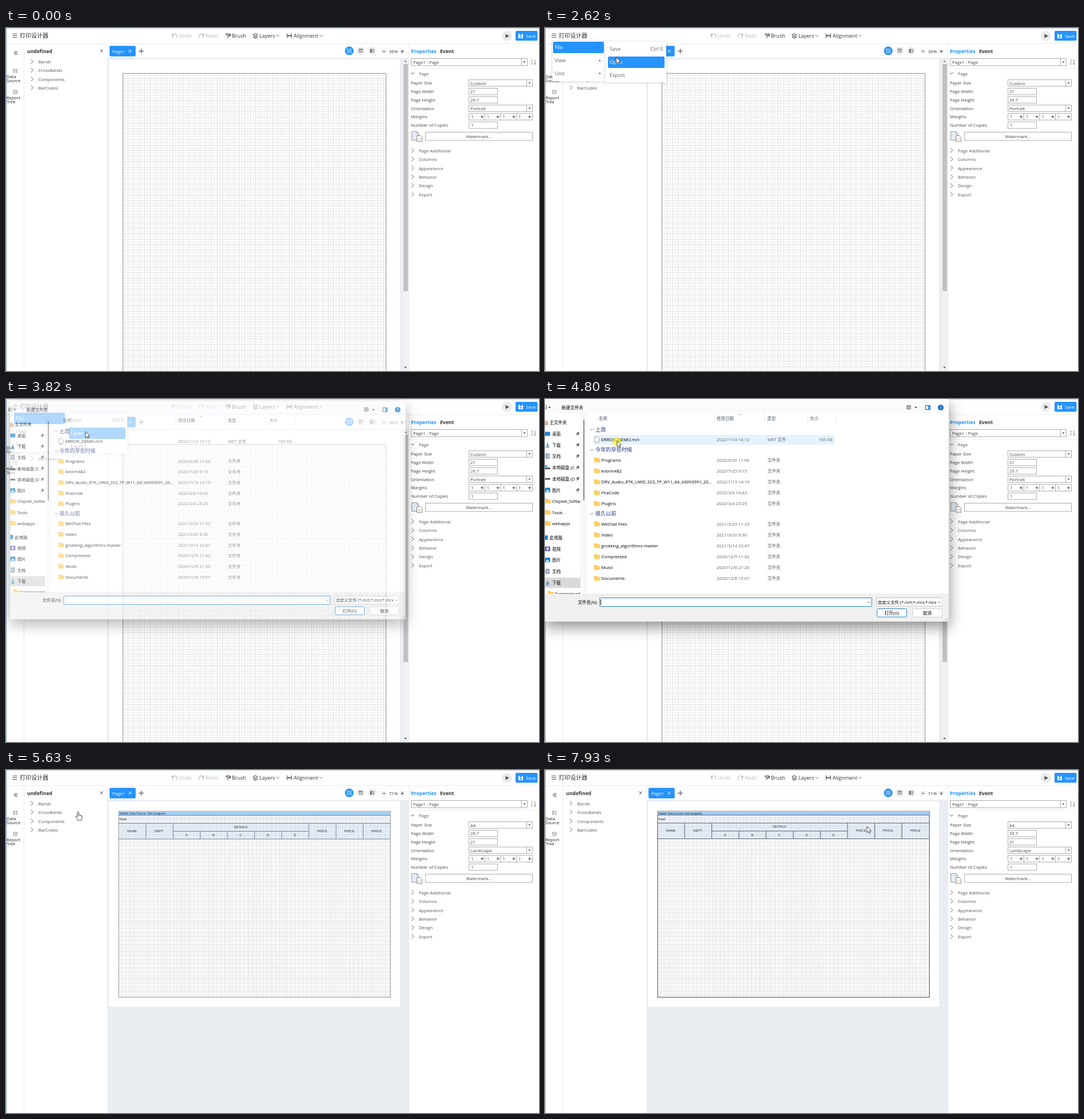
These frames come from a looping animation (932 by 601 pixels, 8000 ms). An HTML page:

```html
<!DOCTYPE html>
<html lang="zh">
<head>
<meta charset="utf-8">
<title>打印设计器</title>
<style>
html, body { margin: 0; width: 100%; height: 100%; overflow: hidden; background: #fff; }
svg { display: block; width: 100vw; height: 100vh; }
text { font-family: "Open Sans", "Noto Sans CJK SC", "Noto Sans CJK", sans-serif; white-space: pre; }
.arial text { font-family: "Liberation Sans", Arial, sans-serif; }
.crisp { shape-rendering: crispEdges; }
#dialog { transform-origin: 353px 195px; filter: drop-shadow(0 9px 13px rgba(0,0,0,.45)); }
</style>
</head>
<body>
<svg id="stage" viewBox="0 0 932 601" xmlns="http://www.w3.org/2000/svg"></svg>
<script>
const BLUE = '#2593fc', PANE = '#e9edf2', LINE = '#ebebeb', EDGE = '#ababab';

// ---- drawing helpers, all return markup ----
const rect = (x, y, w, h, fill, more = '') =>
  `<rect x="${x}" y="${y}" width="${w}" height="${h}" fill="${fill}" ${more}/>`;
const box = (x, y, w, h, stroke = EDGE, fill = '#fff', more = '') =>
  rect(x + .5, y + .5, w - 1, h - 1, fill, `stroke="${stroke}" ${more}`);
const path = (d, stroke = '#555', width = 1, fill = 'none', more = '') =>
  `<path d="${d}" stroke="${stroke}" stroke-width="${width}" fill="${fill}" ${more}/>`;
const disc = (x, y, r, fill, more = '') => `<circle cx="${x}" cy="${y}" r="${r}" fill="${fill}" ${more}/>`;
const text = (x, mid, str, fill = '#444', size = 7.65, more = '') =>
  `<text x="${x}" y="${mid + size * .36}" font-size="${size}" fill="${fill}" ${more}>${str}</text>`;
const group = (id, body, more = '') => `<g id="${id}" ${more}>${body}</g>`;
const down = (x, y, s = 3, c = '#555') => path(`M${x - s} ${y - s / 2}l${s} ${s}l${s} ${-s}`, c, .9);
const right = (x, y, c = '#555') => path(`M${x - 2} ${y - 4}l4 4l-4 4`, c, .9);
const tri = (x, y, c = '#555') => path(`M${x - 2.2} ${y - 1.2}h4.4l-2.2 2.6z`, 'none', 0, c);
const cross = (x, y, s, c, w = .9) => path(`M${x - s} ${y - s}l${2 * s} ${2 * s}m0 ${-2 * s}l${-2 * s} ${2 * s}`, c, w);
const MIDDLE = 'text-anchor="middle"', END = 'text-anchor="end"', BOLD = 'font-weight="700"';

function grid(x, y, w, h, step) {
  let d = ['', ''];
  for (let i = 1; i * step < w; i++) d[i % 2] += `M${Math.floor(x + i * step) + .5} ${y}v${h}`;
  for (let i = 1; i * step < h; i++) d[i % 2] += `M${x} ${Math.floor(y + i * step) + .5}h${w}`;
  return rect(x, y, w, h, '#fdfdfd') + path(d[1], '#f0f0f0') + path(d[0], '#e5e5e5');
}

// ---- application frame ----
function toolbar() {
  const turn = (x, flip) => path(`M${x - 2.5 * flip} 17.3a4 4 0 1 ${flip > 0 ? 1 : 0} ${5 * flip} 0M${x - 4.5 * flip} 9.5v3h${3 * flip}`, '#999', .9);
  return path('M11.5 10.5h8M11.5 13.5h8M11.5 16.5h8', '#555') +
    text(24, 13.5, '打印设计器', '#333', 10) +
    turn(295, 1) + text(302, 13.5, 'Undo', '#b9bbbf', 9) +
    turn(341.5, -1) + text(349, 13.5, 'Redo', '#b9bbbf', 9) +
    path('M385.5 10h6v2.5h-6zM384 11h1.5M391.5 11h1v3h-4.5v4', '#333', .9) + text(395, 13.5, 'Brush', '#333', 9) +
    path('M436 9.5l4 2.2l-4 2.2l-4-2.2zM432 14l4 2.2l4-2.2M432 16l4 2.2l4-2.2', '#333', .9) +
    text(443, 13.5, 'Layers', '#333', 9) + down(475, 13.5, 2.7) +
    path('M491.5 9.5v8M499.5 9.5v8M494 11.5v4M497 11.5v4M491.5 13.5h8', '#333', .9) +
    text(503, 13.5, 'Alignment', '#333', 9) + down(551, 13.5, 2.7) +
    disc(876, 14, 9, '#ebebeb') + path('M873.5 10.5l6.5 3.5l-6.5 3.5z', 'none', 0, '#555') +
    rect(891, 5, 38.5, 17.3, BLUE, 'rx="2"') + rect(896, 10, 8, 8, '#fff', 'rx="1"') +
    rect(898, 10, 4, 2.5, BLUE) + rect(898, 14.5, 4, 2, BLUE) + text(909, 14, 'Save', '#fff', 7.9);
}

function sidebar() {
  const labels = [[85, 'Data'], [92, 'Source'], [122, 'Report'], [129, 'Tree']];
  const tree = ['Bands', 'CrossBands', 'Components', 'BarCodes'];
  return path('M13 43.5h2.5M15.5 41v5.5M15.5 41h4v1.5h-4M15.5 45h4v1.5h-4', '#777', .9) +
    path('M13 72h2v2h-2zM17.5 72h2v2h-2zM13 76h2v2h-2zM17.5 76h2v2h-2zM15 73h2.5M14 74v2', '#888', .8) +
    path('M13 109h6.5v6h-6.5zM13 111h6.5M15 113h3', '#888', .8) +
    labels.map(([y, s]) => text(1, y, s, '#222', 7.6)).join('') +
    text(37, 41, 'undefined', '#333', 8.6, BOLD) + cross(167, 40, 2.5, '#444') +
    tree.map((s, i) => right(45.5, 58.5 + 15.4 * i) + text(56.5, 59 + 15.4 * i, s, '#555')).join('');
}

function tabs() {
  const round = (x, sign) => disc(x, 41, 5, '#f0f0f0') + path(`M${x - 2.2} 41h4.4` + (sign ? `M${x} 38.8v4.4` : ''), '#333', 1);
  return rect(181, 31.3, 45.7, 18.5, BLUE, 'rx="2"') + text(186, 41, 'Page1', '#fff', 7.75) + cross(217, 40.5, 2.5, '#fff') +
    path('M232 40.5h9M236.5 36v9', '#444') +
    disc(600.2, 40, 7.6, BLUE) + path('M597.2 36.4v7.2M600.2 36.4v7.2M603.2 36.4v7.2', '#fff', 1.7, 'none', 'stroke-dasharray="1.7 1.05"') +
    disc(620, 40, 8, '#f3f3f3') + path('M617 37h6.5v6h-6.5zM617 40h6.5M619 37v6M621.5 37v6', '#888', .8) + rect(616.5, 36.5, 7.5, 1.5, '#777') +
    disc(640, 40, 8, '#f3f3f3') + path('M637 37h6.5v6h-6.5zM640 39h3M640 41h3', '#777', .8) + rect(637, 37, 2.5, 6, '#666') +
    round(661, false) + round(693, true);
}

function inspector() {
  const labels = ['Paper Size', 'Page Width', 'Page Height', 'Orientation', 'Margins', 'Number of Copies'];
  const sections = ['Page Additional', 'Columns', 'Appearance', 'Behavior', 'Design', 'Export'];
  const field = (y, w) => box(809, y, w, 12.4);
  const drop = (x, y, w, h) => box(x, y, w, h) + path(`M${x + w - 10.5} ${y}v${h}`, EDGE) + tri(x + w - 5.5, y + h / 2);
  let s = text(708, 40.5, 'Properties', BLUE, 8.6, BOLD) + text(759, 40.5, 'Event', '#333', 8.6, BOLD) +
    drop(708, 53, 204, 13.5) + text(712, 60, 'Page1 : Page') +
    text(918, 57.5, 'A', '#3d7fc4', 5) + text(918, 62.5, 'Z', '#555', 5) + path('M925 55.5v8M923.5 62l1.5 2l1.5-2', '#666', .8) +
    rect(705, 70, 227, 1, '#f1f1f1') + down(711, 79.5) + text(722, 80, 'Page', '#555');
  labels.forEach((l, i) => s += text(708, 96.5 + 14.8 * i, l));
  s += drop(809, 90.2, 112, 12.4) + field(105, 51) + field(119.8, 51) + drop(809, 134.5, 112, 12.4) + field(149.3, 112) + field(164.1, 51);
  for (let i = 0; i < 4; i++) {
    const x = 809 + 27.7 * i;
    if (i) s += rect(x, 149.3, 1, 12.4, EDGE);
    s += text(x + 4, 155.5, '1') + path(`M${x + 21} 155.5h5M${x + 23.5} 153v5`, '#555', 1.2);
  }
  return s + text(813, 170.5, '1') +
    path('M709.5 181.5h9l3 3v12h-12z', '#999', 1, '#e4ecf7') + path('M718.5 181.5v3h3', '#999', .8) +
    path('M718.5 188.5h6l3 3v7.5h-9z', '#888', 1, '#fff') + path('M721 193.5h4v3h-4z', '#dcc7a6', .8) +
    box(733, 182, 188, 15.5) + text(827, 190, 'Watermark...', '#444', 7.5, MIDDLE) +
    sections.map((l, i) => right(711, 214.5 + 15.4 * i) + text(722, 215 + 15.4 * i, l, '#555')).join('');
}

const values = (size, w, h, way, zoom) =>
  text(812, 97, size) + text(812, 111.5, w) + text(812, 126.5, h) + text(812, 141, way) + text(677.5, 41, zoom, '#333', 7.8, MIDDLE);

function portrait() {
  return `<g class="crisp">${rect(180, 55, 509, 546, '#fff') + grid(204, 79, 461, 522, 4.853) +
    rect(694, 55, 10, 546, '#f1f1f1') + rect(695, 63, 8, 398, '#c1c1c1')}</g>` +
    path('M204.5 601V79.5H664.5V601', '#8e8e8e') +
    path('M696 59.5l2.5-2.7l2.5 2.7z', 'none', 0, '#777') + tri(698.5, 595, '#444') +
    values('Custom', '21', '29.7', 'Portrait', '36%');
}

function table(shift, line, edge, captionSize) {
  const x = i => 196.6 + shift + 47.5 * i;
  const h = (a, b, y) => rect(x(a), y + shift, x(b) - x(a), 1, line);
  let s = rect(197, 79, 475, 14, '#3c8ce6', 'opacity=".05"') + rect(197, 93, 475, 28, '#3c8ce6', 'opacity=".1"') +
    rect(197, 72.2, 475.3, 326, 'none', `stroke="${edge}"`) + rect(196.8, 72, 475.4, 7, '#a5cdf4') +
    h(0, 10, 79) + h(0, 10, 93) + h(2, 7, 107) + h(0, 10, 120.5);
  for (let i = 1; i < 10; i++) {
    const top = i > 2 && i < 7 ? 107 : 93;
    s += rect(x(i), top, 1, 121 - top, line);
  }
  const cell = (i, y, str) => text(220.5 + shift + 47.5 * i, y + shift, str, '#333', 5.9, MIDDLE);
  s += text(197.5, 76, 'Table8: Data Source: Not Assigned', '#234', captionSize) + text(198, 86, 'Total:', '#222', 5.6);
  [[0, 'NAME'], [1, 'DEPT.'], [7, 'PRICE'], [8, 'PRICE'], [9, 'PRICE']].forEach(([i, str]) => s += cell(i, 106.5, str));
  [...'ABCDE'].forEach((c, i) => s += cell(i + 2, 114, c));
  return s + cell(4, 99.8, 'DETAILS');
}

function landscape() {
  return rect(180, 55, 509, 360, '#fff') + `<g class="crisp">${grid(197, 72, 475, 326, 3.43)}</g>` +
    group('plain', table(0, '#76879a', '#909090', 5.2), 'class="arial"') +
    group('picked', table(-.5, '#566270', '#4a4a4a', 4.95), 'class="arial"') +
    values('A4', '29.7', '21', 'Landscape', '71%');
}

// ---- drop-down menus ----
const SOFT = 'style="filter:drop-shadow(0 1px 3px rgba(0,0,0,.16))"';
const ITEM = '#606266';
const arrow = (y, c) => path(`M95 ${y - 2}l2.5 2l-2.5 2z`, 'none', 0, c);
const mainMenu = () => rect(13, 23, 93, 70, '#fff', SOFT) +
  group('fileOff', text(17, 34, 'File', ITEM, 8.8) + arrow(34, '#555')) +
  group('fileOn', rect(14, 24, 89, 20, BLUE, 'rx="2"') + text(17, 34, 'File', '#fff', 8.8) + arrow(34, '#3a6a9c')) +
  text(17, 57, 'View', ITEM, 8.8) + arrow(57, '#555') + text(17, 79.5, 'Unit', ITEM, 8.8) + arrow(79.5, '#555');
const subMenu = () => rect(106, 24, 106, 71, '#fff', SOFT) +
  text(113, 37, 'Save', ITEM, 8.8) + text(206, 37, 'Ctrl S', ITEM, 8.8, END) +
  text(113, 60, 'Open', ITEM, 8.8) + text(113, 82.5, 'Export', ITEM, 8.8) +
  group('saveOn', rect(110, 27, 99, 20, BLUE, 'rx="2"') + text(113, 37, 'Save', '#fff', 8.8) + text(206, 37, 'Ctrl S', '#fff', 8.8, END)) +
  group('openOn', rect(110, 50, 99, 20, BLUE, 'rx="2"') + text(113, 60, 'Open', '#fff', 8.8));

// ---- file dialog ----
const folder = (x, y) => rect(x, y - 4, 5, 3, '#e9a52a', 'rx=".8"') + rect(x, y - 3, 10, 7, '#ffd062', 'rx=".8"');
const sheet = (x, y) => path(`M${x} ${y - 4.5}h5l2.5 2.5v7h-7.5z`, '#8a8a8a', .8, '#fff');
const icons = {
  home: y => path(`M0 ${y}l2-3l3 3v4h-5z`, '#b8764a', .8, '#f0c090'),
  pc: y => rect(0, y - 4, 5, 7, '#1a86d8') + rect(0, y + 3, 4, 1, '#777'),
  desk: y => rect(0, y - 3.5, 9, 7, '#1a86d8', 'rx="1"'),
  get: y => path(`M4.5 ${y - 4}v6M2 ${y}l2.5 2.5l2.5-2.5M1 ${y + 4}h7`, '#1a86c8', 1.2),
  doc: y => rect(1, y - 4.5, 7, 9, '#8296b0', 'rx="1"') + path(`M2.5 ${y - 2}h4M2.5 ${y}h4M2.5 ${y + 2}h4`, '#fff', .8),
  win: y => rect(0, y, 9, 3, '#555') + rect(0, y - 4, 4, 3, BLUE),
  disk: y => rect(0, y - 1, 9, 3, '#555', 'rx="1"'),
  pic: y => rect(0, y - 4, 9, 8, '#1a7fd0', 'rx="1"') + path(`M1 ${y + 3}l3-4l4 4z`, 'none', 0, '#fff'),
  film: y => rect(0, y - 4, 9, 8, '#5a55a8', 'rx="1"') + rect(2.5, y - 2.5, 4, 5, '#dcd8ff'),
  dir: y => folder(0, y)
};
const NAV = [
  [41, 'home', '主文件夹'], [61, 'desk', '桌面', 1], [80.5, 'get', '下载', 1], [100, 'doc', '文档', 1],
  [120, 'win', '本地磁盘 (C', 1], [139.5, 'disk', '本地磁盘 (D', 1], [159.5, 'pic', '图片', 1],
  [179, 'dir', 'Chipset_Softw'], [198.5, 'dir', 'Tools'], [218, 'dir', 'webapps'], [243, 'pc', '此电脑'],
  [262.5, 'film', '视频'], [282, 'pic', '图片'], [302, 'doc', '文档'], [322, 'get', '下载']
];
const RECENT = [['Programs', '2022/9/26 11:06'], ['kvbrm482', '2022/7/25 9:15'],
  ['DRV_Audio_RTK_UWD_SS3_TP_W11_64_V6093591_20...', '2022/7/19 14:19'], ['FiraCode', '2022/3/6 10:43'], ['Plugins', '2022/3/4 23:29']];
const OLD = [['WeChat Files', '2021/3/29 11:33'], ['Video', '2021/3/20 9:30'], ['grokking_algorithms-master', '2021/3/14 23:47'],
  ['Compressed', '2020/12/9 11:42'], ['Music', '2020/12/8 21:20'], ['Documents', '2020/12/8 15:07']];

function fileDialog() {
  const INK = '#000', GREY = '#636363';
  const head = (y, s) => down(82, y, 2.5, '#777') + text(88, y, s, '#1c3580', 9.2);
  const rows = (list, y0) => list.map(([name, date], i) => {
    const y = y0 + 19.1 * i;
    return folder(86, y) + text(98.5, y, name, INK, 7.6) + text(300, y, date, GREY, 7.6) + text(389, y, '文件夹', GREY, 7.5);
  }).join('');
  let s = rect(0, 0, 706, 390, '#fff') + rect(0, 0, 706, 25, '#fafbfc') + rect(62, 25, 11, 316, '#f8f8f8') +
    rect(0, 341, 706, 49, '#f0f0f0') + rect(67, 36, 2, 142, '#8a8a8a', 'rx="1"') +
    text(-4, 15, '织', INK, 7.5) + tri(8, 15, '#333') + text(29, 15.5, '新建文件夹', INK, 7.6) +
    path('M632 11.5h8M632 13.5h8M632 15.5h8M632 17.5h8', '#444', .9) + tri(648.5, 15, '#333') +
    path('M665.5 11.5h8v7h-8z', '#345', 1) + rect(670, 11.5, 4, 7, BLUE) +
    disc(692, 15, 5, '#1473c8') + text(692, 15, '?', '#fff', 7, MIDDLE);
  [[94, '名称'], [300, '修改日期'], [388.5, '类型'], [463, '大小']].forEach(([x, l]) => s += text(x, 34, l, '#4c5668', 7.5));
  [296, 384, 459, 508].forEach(x => s += rect(x - .5, 26, 1, 16, '#e5e5e5'));
  s += path('M338 26l2.5 2l2.5-2', '#888', .8) + rect(0, 313, 62, 18, '#d9d9d9');
  NAV.forEach(([y, icon, l, pin]) => {
    s += icons[icon](y) + text(icon === 'home' || icon === 'pc' ? 8 : 12.5, y + .5, l, INK, 7.5);
    if (pin) s += path(`M54 ${y + 3.5}l2.5-2.5M55 ${y - .5}l3 3l.5-2l1.5-1.5l-2-2l-1.5 1.5z`, '#555', .8, '#777');
  });
  s += '<clipPath id="cut"><rect y="330" width="62" height="11.5"/></clipPath>' +
    `<g clip-path="url(#cut)">${folder(5, 341) + text(17, 341.3, 'Compressed', INK)}</g>` +
    head(53.5, '上周') + head(89, '今年的早些时候') + head(201, '很久以前') +
    rect(86, 63, 420, 17, '#e5f3ff', 'id="hover"') + sheet(87, 71) + text(98.5, 71.5, 'ERROR_DEMO.mrt', INK, 7.8) +
    text(300, 71.5, '2022/11/4 16:12', GREY, 7.6) + text(389, 71.5, 'MRT 文件', GREY, 7.5) + text(503, 71.5, '185 KB', GREY, 7.6, END) +
    rows(RECENT, 107) + rows(OLD, 219) +
    text(92, 356, '文件名(N):', INK, 7.5, END) + box(95, 348, 477, 16, '#2a84c6', '#fff', 'rx="1"') + down(566.5, 356, 2.3) +
    group('caret', rect(97, 351, 1, 10, '#111')) + group('fileName', text(98, 356, 'ERROR_DEMO.mrt', INK, 7.8)) +
    box(579, 348, 116, 15.5, '#c6c6c6') + text(582, 356, '自定义文件 (*.mrt;*.mrz;*.mrx)', INK, 7.4) +
    rect(684.5, 349, 10, 13, '#fff') + down(689.5, 356, 2.3) +
    box(580, 367, 53, 15.5, '#2a84c6', '#fdfdfd', 'rx="2"') + text(606.5, 375, '打开(O)', INK, 7.5, MIDDLE) +
    box(642, 367, 53, 15.5, '#d0d0d0', '#fdfdfd', 'rx="2"') + text(668.5, 375, '取消', INK, 7.5, MIDDLE);
  return s + path('M700 388.5l4-4M702.5 388.5l1.5-1.5', '#aaa', 1);
}

const pointer = () =>
  group('arrow', path('M0 0V10.8L2.5 8.5L4.2 12.2L5.9 11.4L4.3 7.9H7.7Z', '#222', .8, '#fff')) +
  group('hand', path('M-1.2 8.5V1.2a1.2 1.2 0 0 1 2.4 0V5.5q1.8-.6 2.2.6q1.6-.4 2 .7q1.5-.2 1.5 1.2V11q0 2-1.2 3.2V15H-.8V14.2Q-2.8 11.5-3.8 9.2q-.4-1.4.9-1.6q.9.1 1.7 1.4Z', '#333', .9, '#fff') +
    path('M1.2 5.5v2.5M3.4 6.2v2M5.4 7v1.5', '#555', .7));

document.getElementById('stage').innerHTML =
  rect(0, 0, 932, 601, '#fff') + rect(178, 52.5, 526, 549, PANE) +
  `<g class="crisp">${rect(0, 27, 932, 1, LINE) + rect(31, 27, 1, 574, LINE) + rect(177, 27, 1, 574, '#f0f0f0') + rect(704, 27, 1, 574, LINE)}</g>` +
  toolbar() + sidebar() + tabs() + inspector() + group('first', portrait()) + group('second', landscape()) +
  rect(0, 0, 932, 1, '#c3d0d6') + rect(0, 0, 1, 601, '#7fa9bd') +
  group('menu', mainMenu()) + group('sub', subMenu()) + group('dialog', fileDialog()) +
  disc(125.5, 74.5, 7.5, '#ffe81a', 'id="click" opacity=".65"') + group('cursor', pointer());

// ---- timeline ----
const LOOP = 8000;
const PATH = [
  [180, 872, 612], [930, 22, 40], [1130, 15, 14], [1330, 15, 15], [1530, 18, 22], [1670, 24, 27], [1900, 26, 29],
  [2280, 98, 36], [2560, 122, 49], [2750, 132, 58], [2950, 131, 50], [3150, 139, 57], [4180, 139, 57], [4340, 127, 72],
  [4600, 126, 73], [5860, 126, 73], [6580, 480, 219], [6710, 471, 216], [6840, 478, 224], [7000, 478, 224],
  [7590, 584, 124], [7760, 584, 124], [7930, 563, 99]
];
const $ = id => document.getElementById(id);
const ramp = (t, a, b) => Math.min(1, Math.max(0, (t - a) / (b - a)));
const during = (t, a, b) => t >= a && t < b;
const show = (id, on) => $(id).style.display = on ? '' : 'none';
const fade = (id, v) => { show(id, v > 0); $(id).style.opacity = v; };

function place(t) {
  const i = PATH.findIndex(p => p[0] > t);
  if (i === 0) return PATH[0].slice(1);
  if (i < 0) return PATH[PATH.length - 1].slice(1);
  const [t0, x0, y0] = PATH[i - 1], [t1, x1, y1] = PATH[i];
  const k = ramp(t, t0, t1), e = k * k * (3 - 2 * k);
  return [x0 + (x1 - x0) * e, y0 + (y1 - y0) * e];
}

function draw() {
  const t = performance.now() % LOOP;
  const loaded = t >= 5630;
  show('first', !loaded);
  show('second', loaded);
  show('plain', t < 6440);
  show('picked', t >= 6440);

  const close = 1 - ramp(t, 5220, 5500);
  fade('menu', ramp(t, 1070, 1300) * close);
  fade('sub', ramp(t, 1500, 1660) * close);
  show('fileOff', t < 1530);
  show('fileOn', t >= 1530);
  show('saveOn', during(t, 2350, 2560));
  show('openOn', t >= 2560);

  const open = ramp(t, 3640, 3920) * (1 - ramp(t, 4930, 5100));
  fade('dialog', open);
  $('dialog').style.transform = `scale(${.94 + .06 * open})`;
  show('hover', t >= 4200);
  $('hover').setAttribute('fill', t < 4865 ? '#e5f3ff' : '#cce8ff');
  show('caret', during(t, 4200, 4865));
  show('fileName', t >= 4865);
  show('click', during(t, 4790, 4865) || during(t, 4930, 5000));

  const hand = during(t, 1000, 2350) || during(t, 5080, 6000);
  show('hand', hand);
  show('arrow', !hand);
  $('cursor').setAttribute('transform', `translate(${place(t).join(' ')})`);
  requestAnimationFrame(draw);
}
draw();
</script>
</body>
</html>
```
